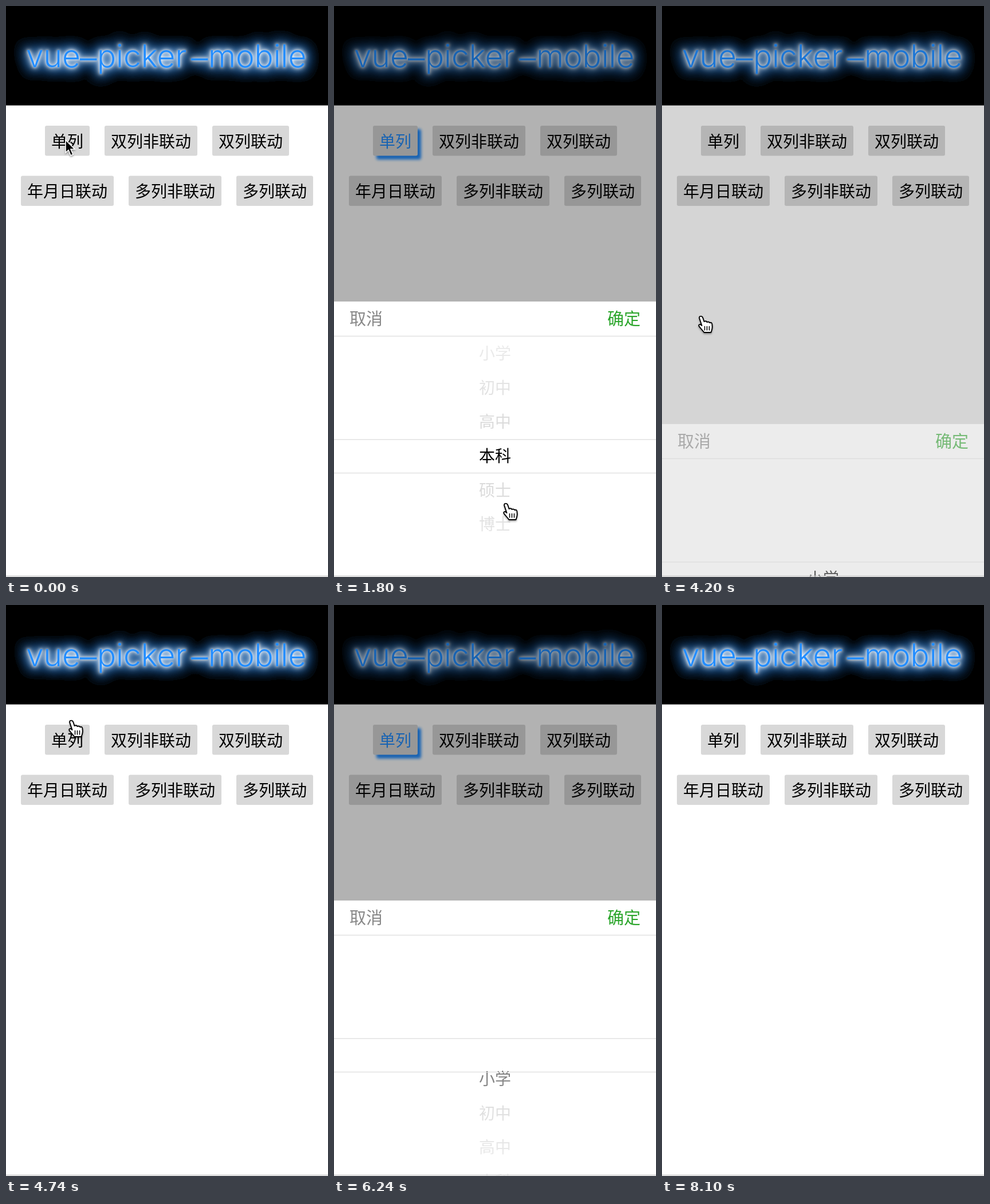
Recreate the animation shown at these times as an HTML page. Size 562 px wide and 997 px high, loop 8160 ms.

```html
<!DOCTYPE html>
<html lang="zh-CN">
<head>
<meta charset="utf-8">
<style>
html, body { margin: 0; width: 100%; height: 100%; overflow: hidden; background: #fff; }
svg { display: block; width: 100vw; height: 100vh; }
text { font-family: "Noto Sans CJK SC", "Noto Sans CJK", sans-serif; font-size: 28px; }
.title { font-family: Inter, "Liberation Sans", sans-serif; font-size: 55px; font-weight: 300; fill: #228dff; }
.dash { font-family: "Liberation Sans", sans-serif; font-size: 53px; }
.bar { font-size: 29px; }
</style>
</head>
<body>
<svg viewBox="0 0 562 997">
  <defs>
    <filter id="glow" filterUnits="userSpaceOnUse" x="0" y="0" width="562" height="173" color-interpolation-filters="sRGB">
      <feFlood flood-color="#228dff" result="blue"/>
      <feFlood flood-color="#fff" result="white"/>
      <feGaussianBlur id="halo" in="SourceAlpha" stdDeviation="11"/>
      <feComponentTransfer result="wide"><feFuncA type="gamma" amplitude="1.4" exponent=".55"/></feComponentTransfer>
      <feGaussianBlur in="SourceAlpha" stdDeviation="7.5" result="mid"/>
      <feGaussianBlur in="SourceAlpha" stdDeviation="5" result="close"/>
      <feGaussianBlur in="SourceAlpha" stdDeviation="2.5" result="near"/>
      <feComposite in="blue" in2="wide" operator="in" result="outer"/>
      <feComposite in="white" in2="mid" operator="in" result="middle"/>
      <feComposite in="white" in2="close" operator="in" result="inner"/>
      <feComposite in="white" in2="near" operator="in" result="rim"/>
      <feMerge>
        <feMergeNode in="outer"/><feMergeNode in="middle"/><feMergeNode in="inner"/>
        <feMergeNode in="rim"/><feMergeNode in="SourceGraphic"/>
      </feMerge>
    </filter>
    <filter id="soft" x="-30%" y="-30%" width="160%" height="160%"><feGaussianBlur stdDeviation="2.5"/></filter>
    <linearGradient id="fadeDown" x1="0" y1="0" x2="0" y2="1">
      <stop offset="0" stop-color="#fff" stop-opacity=".5"/><stop offset="1" stop-color="#fff" stop-opacity=".78"/>
    </linearGradient>
    <linearGradient id="fadeUp" x1="0" y1="1" x2="0" y2="0">
      <stop offset="0" stop-color="#fff" stop-opacity=".5"/><stop offset="1" stop-color="#fff" stop-opacity=".78"/>
    </linearGradient>
    <clipPath id="listClip"><rect y="62" width="562" height="419"/></clipPath>
  </defs>
  <rect width="562" height="997" fill="#fff"/>
  <rect width="562" height="173.6"/>
  <text class="title" y="107" filter="url(#glow)"><tspan x="35">vue</tspan><tspan x="129" class="dash">–</tspan><tspan x="159">picker</tspan><tspan x="323" class="dash">–</tspan><tspan x="353">mobile</tspan></text>
  <rect id="shadow" x="74" y="215" width="78" height="53" rx="3" fill="#228dff" filter="url(#soft)"/>
  <g id="buttons"></g>
  <rect id="shade" width="562" height="997"/>
  <g id="panel">
    <rect width="562" height="482" fill="#fff"/>
    <g id="list" clip-path="url(#listClip)"></g>
    <rect y="61" width="562" height="180" fill="url(#fadeUp)"/>
    <rect y="300" width="562" height="182" fill="url(#fadeDown)"/>
    <path d="M0 60.5H562M0 241H562M0 299.5H562" stroke="#e2e2e2" stroke-width="1.3"/>
    <text class="bar" x="27" y="41" fill="#888">取消</text>
    <text class="bar" x="535" y="41" text-anchor="end" fill="#2ba52b">确定</text>
  </g>
  <path d="M0 995.5H562" stroke="#c8c8c8" stroke-width="1.5"/>
  <g id="cursor" style="filter:drop-shadow(0 2px 1.5px rgba(0,0,0,.35))">
    <path id="arrow" d="M0 0V22L5 17.5L9 27L13 25.3L9 16H16Z" stroke="#fff" stroke-width="1.6"/>
    <g id="hand" transform="translate(-5.5 -2)" stroke="#000" stroke-linejoin="round" stroke-linecap="round">
      <path d="M4 1C6 0 8 1 9 4L11 10C13 9 15 9 16 11C18 10 20 11 21 12C24 11 25 13 25 16C26 21 25 24 23 29H11C8 25 5 22 2 18C1 15 4 14 6 16L7 17L3 5C2 3 3 1 4 1Z" fill="#fff" stroke-width="1.9"/>
      <path d="M12 18.5V25M16 18.5V25M20 18.5V25" fill="none" stroke-width="1.5"/>
    </g>
  </g>
</svg>
<script>
const LOOP = 8160, STEP = 60, SLIDE = 450, ROW = 59.7;
const PANEL_TOP = 516, PANEL_HEIGHT = 481;
const LEVELS = ['小学', '初中', '高中', '本科', '硕士', '博士'];
const BUTTONS = [
  [68, 209, '单列'], [172, 209, '双列非联动'], [360, 209, '双列联动'],
  [26, 296.5, '年月日联动'], [214, 296.5, '多列非联动'], [402, 296.5, '多列联动']
];
// [open, close] start times
const VISITS = [[900, 4080], [5040, 7080]];
// [time, x, y]
const POINTER = [
  [0, 104, 234], [300, 110, 300], [600, 104, 245], [840, 100, 242], [1080, 100, 267],
  [1300, 105, 268], [1800, 300, 870], [2000, 310, 880], [2300, 315, 745], [2480, 318, 645],
  [2520, 318, 645], [2820, 321, 962], [2940, 322, 968], [3240, 318, 960], [3900, 68, 548],
  [4200, 68, 543], [4740, 114, 203], [4920, 108, 232], [5100, 105, 245], [5400, 180, 600],
  [5760, 300, 770], [6200, 310, 1010], [6660, 300, 1010], [7000, 68, 545], [7200, 68, 543],
  [7440, 60, 345], [7620, 40, 318], [7860, -40, 300]
];
// [time, list offset]
const SCROLL = [
  [0, -3 * ROW], [2000, -3 * ROW], [2300, -5 * ROW], [2520, -5 * ROW], [2820, 18],
  [2940, 26], [3240, 0], [4800, 0], [4801, -3 * ROW], [5820, -3 * ROW],
  [6240, 42], [6360, 46], [6660, 0]
];

const $ = id => document.getElementById(id);
const clamp = (v, lo, hi) => Math.min(hi, Math.max(lo, v));

function add(parent, tag, attrs, text = '') {
  const node = document.createElementNS('http://www.w3.org/2000/svg', tag);
  for (const key in attrs) node.setAttribute(key, attrs[key]);
  node.textContent = text;
  return parent.appendChild(node);
}

function track(keys, t) {
  const next = keys.findIndex(k => k[0] > t);
  if (next < 0) return keys[keys.length - 1].slice(1);
  const a = keys[next - 1], b = keys[next];
  const u = (t - a[0]) / (b[0] - a[0]), e = u * u * (3 - 2 * u);
  return a.slice(1).map((v, i) => v + (b[i + 1] - v) * e);
}

// cubic-bezier(.25, .1, .25, 1)
function ease(x) {
  if (x <= 0 || x >= 1) return clamp(x, 0, 1);
  const bezier = (s, p, q) => 3 * (1 - s) ** 2 * s * p + 3 * (1 - s) * s * s * q + s ** 3;
  let lo = 0, hi = 1;
  for (let i = 0; i < 24; i++) {
    const mid = (lo + hi) / 2;
    if (bezier(mid, .25, .25) < x) lo = mid; else hi = mid;
  }
  return bezier(lo, .1, 1);
}

const labels = BUTTONS.map(([x, y, label]) => {
  add($('buttons'), 'rect', { x, y, width: label.length * 28 + 22, height: 52.5, rx: 3, fill: '#d8d8d8' });
  return add($('buttons'), 'text', { x: x + 11, y: y + 37.5 }, label);
});
const items = LEVELS.map(name => add($('list'), 'text', { x: 281, 'text-anchor': 'middle' }, name));

function render(t) {
  const shown = VISITS.reduce((sum, [open, close]) =>
    sum + ease((t - open) / SLIDE) - ease((t - close) / SLIDE), 0);
  $('shade').setAttribute('opacity', .3 * shown);
  $('panel').setAttribute('opacity', shown);
  $('panel').setAttribute('transform', `translate(0 ${PANEL_TOP + PANEL_HEIGHT * (1 - shown)})`);

  const active = VISITS.some(([open, close]) => t >= open - 60 && t < close);
  $('shadow').setAttribute('opacity', active ? 1 : 0);
  labels[0].setAttribute('fill', active ? '#228dff' : '#000');

  const [offset] = track(SCROLL, t);
  const selected = clamp(Math.round(-offset / ROW), 0, LEVELS.length - 1);
  items.forEach((item, i) => {
    item.setAttribute('y', 280 + offset + i * ROW);
    item.setAttribute('fill', i === selected ? '#000' : '#b0b0b0');
  });

  $('halo').setAttribute('stdDeviation', 11 + .4 * Math.cos(t / LOOP * 8 * Math.PI));

  const [x, y] = track(POINTER, t);
  const isArrow = t < 480;
  $('cursor').setAttribute('transform', `translate(${x} ${y})`);
  $('arrow').setAttribute('visibility', isArrow ? 'visible' : 'hidden');
  $('hand').setAttribute('visibility', isArrow ? 'hidden' : 'visible');
}

const start = performance.now();
function tick() {
  const t = (performance.now() - start) % LOOP;
  render(Math.floor(t / STEP) * STEP);
  requestAnimationFrame(tick);
}
tick();
</script>
</body>
</html>
```
